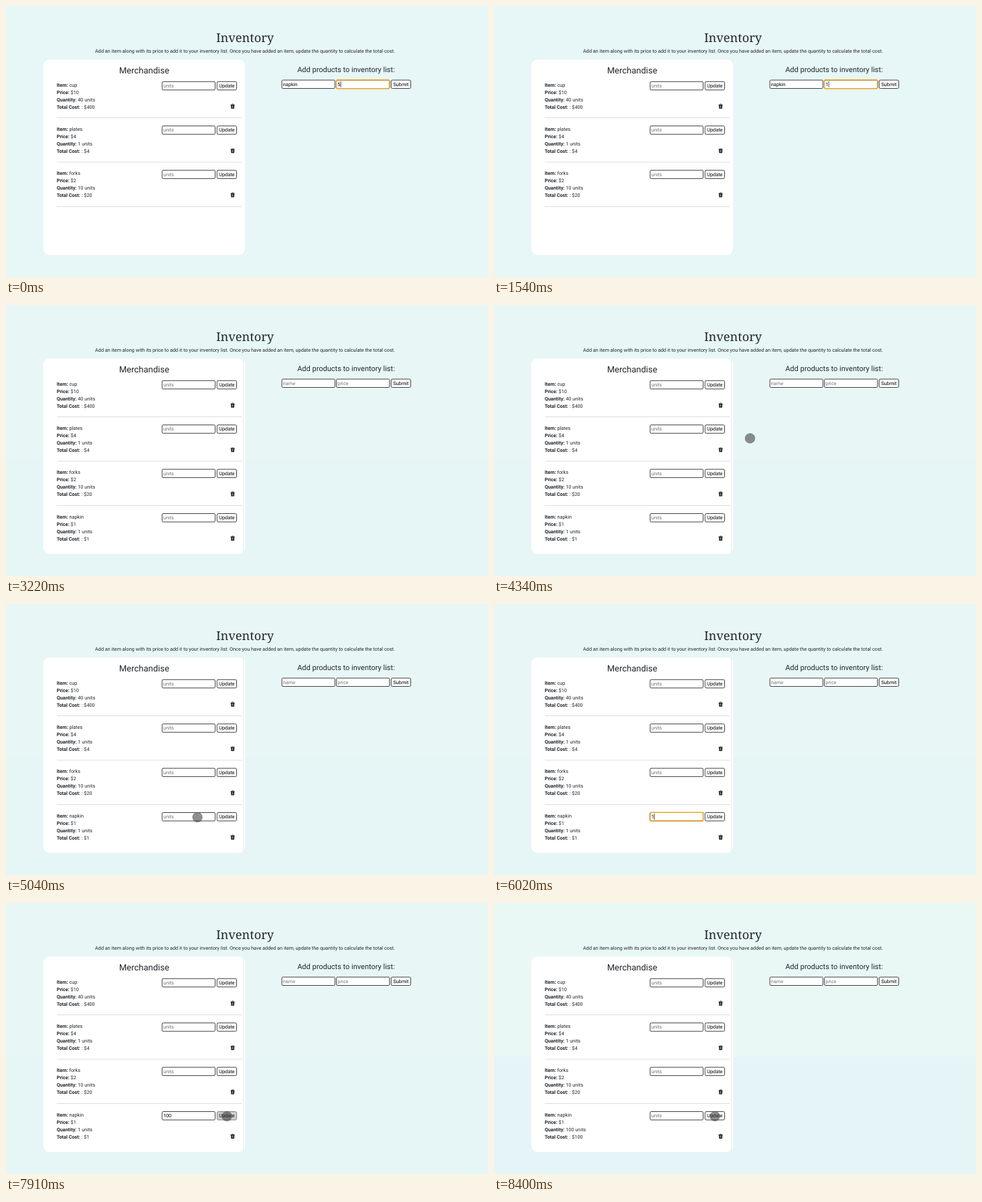
An HTML page that plays this animation: 720 px wide and 406 px high, repeating every 8470 ms.

```html
<!DOCTYPE html>
<html lang="en">
<head>
<meta charset="utf-8">
<title>Inventory</title>
<style>
  html, body { margin: 0; width: 100%; height: 100%; overflow: hidden; background: #e7f6f6; }
  svg { display: block; width: 720px; height: 406px; }
  text { font: 7.31px Roboto, sans-serif; fill: #212529; text-rendering: geometricPrecision; }
  .title { font: 18.2px "Noto Serif", serif; }
  .card-title { font-size: 13px; }
  .form-title { font-size: 11px; }
  .mid { text-anchor: middle; }
  .hint { fill: #757575; }
  .typed { fill: #000; }
  tspan { font-weight: 700; }
</style>
</head>
<body>
<svg id="stage" viewBox="0 0 720 406"></svg>
<script>
const LOOP = 8470, STEP = 70;
const stage = document.getElementById("stage");

// Times of the user's actions
const ERASE = 770, RETYPE = 1050, TAB = 2100, PRESS = 2940, ADD = 3150,
      FOCUS = 5250, KEYS = [6020, 6230, 6370], CLICK = 7910, UPDATE = 8190, TINT = 8400;

// Pointer legs: start, end, from, to
const LEGS = [
  [4060, 4900, [440, 126], [287, 322]],
  [4900, 5040, [287, 322], [286, 319.5]],
  [5040, 6020, [286, 319.5], [286, 319.5]],
  [7070, 7490, [301, 318.7], [331, 319.3]],
  [7490, 7700, [331, 319.3], [330, 319.5]],
  [7700, LOOP, [330, 319.5], [330, 319.5]]
];

const text = (x, y, s, cls = "") => `<text x="${x}" y="${y}" class="${cls}">${s}</text>`;

const rect = (x, y, w, h, fill, more = "") =>
  `<rect x="${x}" y="${y}" width="${w}" height="${h}" fill="${fill}" ${more}/>`;

const ring = (x, y, w) =>
  rect(x - .2, y - .2, w + .4, 12.9, "none", 'rx="2" stroke="#eda12a" stroke-width="1.5"');

function field(x, y, value, hint, focused) {
  let s = rect(x, y, 79.2, 12.5, "#fff", 'rx="1.6" stroke="#2b2b2b" stroke-width=".9"');
  if (focused) s += ring(x, y, 79.2);
  s += text(x + 1.7, y + 8.7, value || hint, value ? "typed" : "hint");
  if (focused) s += rect(x + 2 + value.length * 4.11, y + 1.7, .7, 9, "#000");
  return s;
}

function button(x, y, label, pressed, focused) {
  return rect(x, y, 29.3, 12.5, pressed ? "#cfcfcf" : "#fff",
      `rx="2" stroke="${pressed ? "#777" : "#2b2b2b"}" stroke-width=".9"`) +
    (focused ? ring(x, y, 29.3) : "") +
    text(x + 14.65, y + 8.7, label, "typed mid");
}

const trash = (x, y) =>
  `<g transform="translate(${x} ${y}) scale(.457)" fill="#111">
    <path d="M5 2.5V1.5Q5 0 6.5 0h3Q11 0 11 1.5v1h4v1.2H1V2.5zM6 2.5h4V1H6z" fill-rule="evenodd"/>
    <path d="M2 3.5h12l-.9 11.2Q13 16 11.6 16H4.4Q3 16 2.9 14.7z"/>
    <path d="M5.3 5.5l.4 8M8 5.5v8M10.7 5.5l-.4 8" stroke="#fff" stroke-width=".9"/>
  </g>`;

function item(i, name, price, units, input, focused, pressed) {
  const y = 120.6 + i * 66.4;
  const rows = [["Item:", name], ["Price:", "$" + price],
    ["Quantity:", units + " units"], ["Total Cost:", ": $" + price * units]];
  return rows.map(([k, v], n) => text(75.7, y + n * 10.97, `<tspan>${k}</tspan> ${v}`)).join("") +
    field(233.2, y - 7.3, input, "units", focused) +
    button(315.2, y - 7.3, "Update", pressed) +
    trash(334.9, y + 25.9) +
    (i < 3 ? rect(76, y + 46.6, 276, .8, "#d3d5d6") : "");
}

function pointer(t) {
  const leg = LEGS.find(([a, b]) => t >= a && t < b);
  if (!leg) return "";
  const [a, b, from, to] = leg;
  const u = Math.min(1, (t - a + STEP) / (b - a)), e = u * u * (3 - 2 * u);
  const [x, y] = from.map((p, i) => p + (to[i] - p) * e);
  return `<circle cx="${x}" cy="${y}" r="7.3" fill="#3c3c3c" fill-opacity=".58" stroke="#555" stroke-opacity=".6" stroke-width=".7"/>`;
}

function draw(t) {
  const added = t >= ADD, updated = t >= UPDATE;
  const [top, bottom] = t >= TINT ? ["#e9f8f5", "#e5f4f6"]
    : added ? ["#e8f7f6", "#e6f5f6"] : ["#e7f6f6", "#e7f6f6"];
  const price = added ? "" : t < ERASE ? "5" : t < RETYPE ? "" : "1";
  const typed = updated ? "" : "100".slice(0, KEYS.filter(k => t >= k).length);

  stage.innerHTML =
    rect(0, 0, 720, 230, top) + rect(0, 230, 720, 176, bottom) +
    text(357, 54, "Inventory", "title mid") +
    text(357, 69.6, "Add an item along with its price to add it to your inventory list. Once you have added an item, update the quantity to calculate the total cost.", "mid") +
    rect(55.7, 80.2, 301.4, 292.8, "#fff", 'rx="9"') +
    (added ? rect(354.2, 82, .7, 289, "#dedede") : "") +
    text(206.4, 101.1, "Merchandise", "card-title mid") +
    item(0, "cup", 10, 40, "") +
    item(1, "plates", 4, 1, "") +
    item(2, "forks", 2, 10, "") +
    (added ? item(3, "napkin", 1, updated ? 100 : 1, typed,
      t >= FOCUS && t < CLICK, t >= CLICK && !updated) : "") +
    text(508, 99, "Add products to inventory list:", "form-title mid") +
    field(412.1, 111, added ? "" : "napkin", "name") +
    field(493.6, 111, price, "price", t < TAB) +
    button(575.3, 111, "Submit", t >= PRESS && !added, t >= TAB && !added) +
    pointer(t);
}

let last = -1;
function tick(now) {
  const t = Math.floor(now % LOOP / STEP) * STEP;
  if (t !== last) draw(last = t);
  requestAnimationFrame(tick);
}
const start = performance.now();
requestAnimationFrame(function run() {
  tick(0);
});
tick = (step => function () {
  const t = Math.floor((performance.now() - start) % LOOP / STEP) * STEP;
  if (t !== last) draw(last = t);
  requestAnimationFrame(tick);
})();
</script>
</body>
</html>
```
